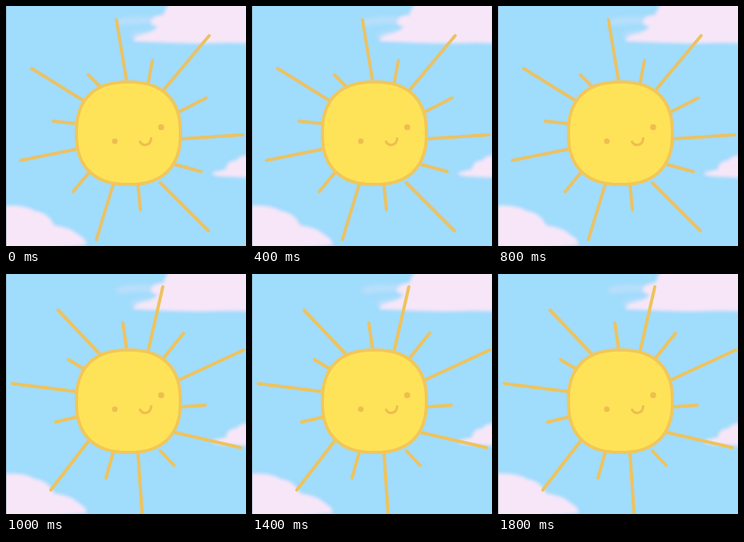
An HTML page with a canvas that plays this animation: 300 by 300 pixels, repeating every 2 s.

```html
<!DOCTYPE html>
<html>
<head>
<meta charset="utf-8">
<title>Sunny sky</title>
<style>
html, body { margin: 0; width: 100%; height: 100%; overflow: hidden; background: #a0dcfc; }
canvas { display: block; width: 300px; height: 300px; }
</style>
</head>
<body>
<canvas id="stage" width="300" height="300"></canvas>
<script>
const ctx = document.getElementById('stage').getContext('2d');
const STEP = 200, STEPS = 10, BLINK_STEP = 8;

// Each ray: base x, y, then the tip for the even and the odd pose.
const rays = [
  [151, 95, 138, 17, 146, 61], [178, 95, 183, 68, 196, 16],
  [197, 105, 254, 37, 222, 74], [215, 133, 250, 115, 297, 95],
  [219, 166, 296, 161, 249, 164], [211, 198, 244, 207, 293, 217],
  [193, 221, 253, 281, 210, 239], [165, 224, 168, 255, 170, 298],
  [134, 223, 113, 292, 125, 255], [103, 209, 84, 232, 56, 270],
  [88, 179, 18, 193, 62, 185], [88, 147, 59, 144, 8, 137],
  [98, 119, 32, 78, 78, 107], [119, 102, 103, 86, 65, 45]
];

const clouds = [
  'M208 -8 L310 -8 L310 47 L280 46 L240 47 L205 46 L160 44 Q157 39 171 35 Q187 32 189 25 Q178 24 182 17 Q186 11 197 11 Q199 1 208 -8 Z',
  'M310 186 Q291 186 288 193 Q276 193 275 204 L258 208 Q256 212 268 213 L310 215 Z',
  'M-9 250 Q22 247 36 256 Q54 259 60 274 Q82 277 92 287 Q101 292 101 299 L-9 310 Z'
].map(d => new Path2D(d));
const wisp = new Path2D('M142 20 Q167 16 190 19 M160 37 Q180 34 200 34');

function disc(x, y, r) {
  ctx.beginPath();
  ctx.arc(x, y, r, 0, Math.PI * 2);
  ctx.fill();
}

function smile(x, y, size) {
  ctx.beginPath();
  ctx.moveTo(x - 7 * size, y - size);
  ctx.bezierCurveTo(x - 4 * size, y + 5 * size, x + 6 * size, y + 5 * size, x + 7 * size, y - 5 * size);
  ctx.stroke();
}

function drawSky() {
  ctx.fillStyle = '#a0dcfc';
  ctx.fillRect(0, 0, 300, 300);
  ctx.save();
  ctx.filter = 'blur(3px)';
  ctx.strokeStyle = 'rgba(224,228,250,.45)';
  ctx.lineWidth = 8;
  ctx.stroke(wisp);
  ctx.filter = 'blur(2px)';
  ctx.fillStyle = '#f7e6f8';
  clouds.forEach(cloud => ctx.fill(cloud));
  ctx.restore();
  ctx.fillStyle = 'rgba(130,150,165,.4)';
  ctx.fillRect(0, 0, 1, 300);
}

function drawRays(odd) {
  ctx.strokeStyle = odd ? '#efc35c' : '#ebc264';
  ctx.lineWidth = 4;
  for (const [x, y, ...tips] of rays) {
    ctx.beginPath();
    ctx.moveTo(x, y);
    ctx.lineTo(tips[odd * 2], tips[odd * 2 + 1]);
    ctx.stroke();
  }
}

function drawBody() {
  const squash = v => Math.sign(v) * Math.abs(v) ** (2 / 2.4);
  ctx.beginPath();
  for (let i = 0; i < 120; i++) {
    const a = i / 120 * Math.PI * 2;
    ctx.lineTo(153 + 65 * squash(Math.cos(a)), 159 + 64 * squash(Math.sin(a)));
  }
  ctx.closePath();
  ctx.fillStyle = '#fee358';
  ctx.fill();
  ctx.strokeStyle = '#f1c75a';
  ctx.lineWidth = 4;
  ctx.stroke();
}

function drawFace(blink) {
  ctx.fillStyle = ctx.strokeStyle = '#efbd50';
  ctx.lineWidth = 3;
  smile(174.5, 170.5, 1);
  if (blink) {
    ctx.strokeStyle = '#eabf50';
    smile(140.5, 173, 1);
    smile(192, 153.5, 1);
  } else {
    disc(136, 169, 3.5);
    disc(194, 151.5, 3.8);
  }
}

function draw(now) {
  const step = Math.floor(now / STEP) % STEPS;
  drawSky();
  drawRays(step % 2);
  drawBody();
  drawFace(step === BLINK_STEP);
}

ctx.lineCap = ctx.lineJoin = 'round';
let start;
function tick(now) {
  start ??= now;
  draw(now - start);
  requestAnimationFrame(tick);
}
draw(0);
requestAnimationFrame(tick);
</script>
</body>
</html>
```
